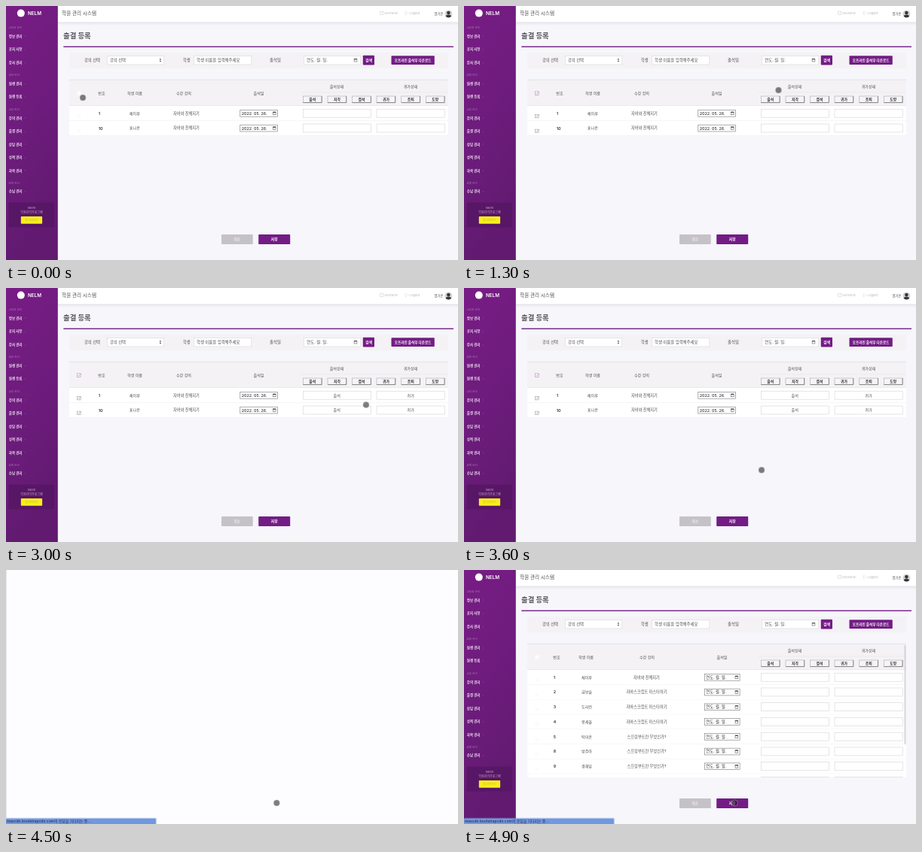
Recreate the animation shown at these times as an HTML page. Size 600 by 338 pixels, loop 5000 ms.

```html
<!DOCTYPE html>
<html lang="ko">
<head>
<meta charset="utf-8">
<title>출결 등록</title>
<style>
  html, body { margin: 0; width: 100%; height: 100%; overflow: hidden; background: #fdfcfe; }
  svg { display: block; width: 100vw; height: 100vh; }
  text { font-family: Inter, "Noto Sans CJK KR", "Noto Sans CJK", sans-serif; font-weight: 500; white-space: pre; }
</style>
</head>
<body>
<svg id="stage" viewBox="0 0 600 338" preserveAspectRatio="none"></svg>
<script>
const LOOP = 5000, STEP = 100;
const PURPLE = '#731c85', PRESSED = '#51155f', INK = '#504d52', PANEL = '#f4f2f4';

const rect = (x, y, w, h, fill, extra = '') =>
  `<rect x="${x}" y="${y}" width="${w}" height="${h}" fill="${fill}" ${extra}/>`;
const frame = (x, y, w, h, line, fill = '#fff', width = 0.6) =>
  rect(x, y, w, h, fill, `stroke="${line}" stroke-width="${width}"`);
// y is the vertical middle of the line of text
const text = (x, y, size, str, fill = INK, anchor = 'start', weight = 500) =>
  `<text x="${x}" y="${y + size * 0.36}" font-size="${size}" fill="${fill}" text-anchor="${anchor}" style="font-weight:${weight}">${str}</text>`;
const mid = (x, y, size, str, fill, weight) => text(x, y, size, str, fill, 'middle', weight);
const path = (d, stroke, width) =>
  `<path d="${d}" fill="none" stroke="${stroke}" stroke-width="${width}"/>`;
const group = (id, body) => `<g id="${id}">${body}</g>`;

const button = (x, y, w, h, fill, label, size, ink = '#fff') =>
  rect(x, y, w, h, fill, 'rx="0.8"') + mid(x + w / 2, y + h / 2, size, label, ink, 700);
const calendar = (x, y) =>
  frame(x - 1.9, y - 1.7, 3.8, 3.7, '#444', 'none', 0.5) + rect(x - 1.9, y - 2, 3.8, 1.2, '#444');

function sidebar() {
  const sections = [[28.5, '교육원 관리'], [92, '회원 관리'], [138, '교육 관리'], [236, '회계 관리']];
  const items = [
    [40, '정보 관리'], [57.7, '공지 사항'], [75.3, '강사 관리'], [103.2, '원생 관리'],
    [120.8, '원생 등록'], [149, '강의 관리'], [166.5, '출결 관리'], [184, '상담 관리'],
    [201.5, '성적 관리'], [219, '과목 관리'], [246.8, '수납 관리']
  ];
  return rect(0, 0, 68.8, 338, 'url(#side)') +
    '<circle cx="19.8" cy="9.6" r="5" fill="#fff"/>' +
    text(29, 9.8, 6.3, 'NELM', '#fff', 'start', 600) +
    sections.map(([y, s]) => text(3.5, y, 3.6, s, '#a673b2')).join('') +
    items.map(([y, s]) =>
      text(3.8, y, 4.5, s, '#eee0f1', 'start', 700) + text(24.4, y, 4, '›', '#9556a1')).join('') +
    rect(3.5, 261.5, 60.5, 33, '#581666', 'rx="1.5"') +
    mid(34, 268.8, 4, 'Nelm', '#b994c2') +
    mid(34, 274.2, 4, '학원관리프로그램', '#c9abd0') +
    button(19.8, 280, 28.3, 9.7, '#f6ee1c', '업그레이드', 3.8, '#dccd24');
}

function header() {
  return rect(68.8, 0, 531.2, 338, '#f6f6fb') +
    rect(68.8, 21, 531.2, 5, 'url(#shade)') + rect(68.8, 0, 531.2, 21.3, '#fff') +
    text(74, 9.6, 6.6, '학원 관리 시스템') +
    frame(496.8, 7.5, 4, 4.2, '#c9c6cc', 'none', 0.5) +
    text(502.3, 9.6, 3.7, 'username', '#c4c1c7') +
    path('M532 7.6h-1.8v4h1.8M532 9.6h2.8', '#d5d2d8', 0.5) +
    text(536, 9.6, 3.9, 'Logout', '#bcb9bf') +
    text(568.5, 10.2, 4.3, '염가온') +
    '<g clip-path="url(#face)">' + rect(582, 5, 11, 11, '#d8d5da') +
    '<circle cx="587.4" cy="9" r="2.3" fill="#39343a"/>' +
    '<ellipse cx="587.4" cy="15" rx="4" ry="3.6" fill="#39343a"/></g>' +
    text(76, 39.8, 9.4, '출결 등록', '#59565c', 'start', 700) +
    rect(76.3, 53.5, 517.7, 1.4, PURPLE);
}

function filters() {
  const line = '#d9d6db';
  return rect(84, 62, 503, 21, PANEL) +
    text(104, 72, 5.3, '강의 선택') + frame(134.3, 66.3, 75.5, 11.6, line) +
    text(138, 72, 5.3, '강의 선택') +
    '<path d="M203.6 71.5l1.3-2 1.3 2zM203.6 72.7l1.3 2 1.3-2z" fill="#555"/>' +
    text(235, 72, 5.3, '학생') + frame(249.3, 66.3, 76.5, 11.6, line) +
    text(253, 72, 5.4, '학생 이름을 입력해주세요') +
    text(350, 72, 5.4, '출석일') + frame(395.3, 66.3, 75.5, 11.6, line) +
    text(399.3, 72, 5.4, '연도. 월. 일.') + calendar(464, 72) +
    button(473.8, 65.8, 15.2, 12.6, PURPLE, '검색', 4.9) +
    button(511.5, 66.2, 57.3, 11.8, PURPLE, '오프라인 출석부 다운로드', 4.6);
}

function tableHead(columns) {
  const labels = ['번호', '학생 이름', '수강 강의', '출석일'];
  const keys = [[394.3, '출석'], [427, '지각'], [459.6, '결석'], [492, '귀가'], [524.8, '조퇴'], [557.3, '도망']];
  return rect(84, 98, 503, 35, PANEL) +
    rect(84, 97.8, 503, 0.7, '#dddadf') + rect(84, 132.6, 503, 0.7, '#dddadf') +
    rect(391, 114.7, 196, 0.5, '#e4e1e6') +
    rect(94.3, 113.5, 5.2, 5.2, '#fdfcfd') +
    columns.map((x, i) => mid(x, 116, 5.1, labels[i])).join('') +
    mid(439, 106.8, 5.1, '출석상태') + mid(537, 106.8, 5.1, '귀가상태') +
    keys.map(([x, s]) =>
      frame(x, 120, 24.8, 8.6, '#9c999f', '#f5f4f6', 0.5) +
      path(`M${x} 128.6h24.8v-8.6`, '#59565c', 0.6) +
      mid(x + 12.4, 124.3, 4.9, s, '#333', 700)).join('');
}

function row(y, [num, name, course], date, at) {
  return rect(84, y - 9.8, 503, 19.6, '#fff') + rect(84, y + 9.6, 503, 0.5, '#ececf0') +
    rect(94.5, y + 1.2, 4.6, 4.6, '#fbfafc') +
    text(at.num, y, 5.3, num, '#333', 'start', 600) +
    text(at.name, y, 5.1, name) +
    mid(at.course, y, 5.2, course) +
    frame(at.date, y - 4.4, at.dateW, 8.8, '#77747a', '#fff', 0.6) +
    text(at.date + 2, y, 5.3, date, '#333') +
    calendar(at.date + at.dateW - 4.2, y) +
    frame(394.3, y - 5.6, 90.2, 11, '#d5d2d8') + frame(492, y - 5.6, 90.2, 11, '#d5d2d8');
}

const tick = (x, y, color) =>
  frame(x - 2.3, y - 2.3, 4.6, 4.6, color, '#fff', 0.5) +
  path(`M${x - 1} ${y}l0.9 1 2.3-2.9`, color, 0.6);

const picked = [['1', '채이루', '자바와 친해지기'], ['10', '표나온', '자바와 친해지기']];
const all = [
  picked[0],
  ['2', '금보슬', '자바스크립트 마스터하기'], ['3', '도라언', '자바스크립트 마스터하기'],
  ['4', '봉세율', '자바스크립트 마스터하기'], ['5', '탁미온', '스프링부트란 무엇인가?'],
  ['8', '방주아', '스프링부트란 무엇인가?'], ['9', '경해담', '스프링부트란 무엇인가?'],
  picked[1]
];
const rowY = [142.8, 162.6];
const pickedAt = { num: 122.8, name: 163.8, course: 239.5, date: 310.8, dateW: 49.6 };
const allAt = { num: 118.8, name: 156, course: 242.5, date: 319.3, dateW: 46.8 };

const stage = document.getElementById('stage');
stage.innerHTML =
  `<defs>
    <linearGradient id="side" x1="0" y1="0" x2="0.3" y2="1">
      <stop offset="0" stop-color="#781c85"/><stop offset="0.5" stop-color="#6e1c7d"/><stop offset="1" stop-color="#611a70"/>
    </linearGradient>
    <linearGradient id="shade" x1="0" y1="0" x2="0" y2="1">
      <stop offset="0" stop-color="#e3e2ea"/><stop offset="1" stop-color="#f6f6fb"/>
    </linearGradient>
    <clipPath id="face"><circle cx="587.4" cy="10.4" r="5"/></clipPath>
    <clipPath id="list"><rect x="84" y="133" width="503" height="143"/></clipPath>
  </defs>` +
  group('page',
    header() + sidebar() + filters() +
    group('before',
      tableHead([127, 171, 236, 335.5]) +
      picked.map((r, i) => row(rowY[i], r, '2022. 05. 26.', pickedAt)).join('') +
      group('checks', tick(96.8, 116.2, '#a268ad') + rowY.map(y => tick(96.8, y + 3.8, '#8f8a92')).join('')) +
      group('present', rowY.map(y => mid(439.3, y, 5.1, '출석')).join('')) +
      group('left', rowY.map(y => mid(537, y, 5.1, '귀가')).join(''))) +
    group('after',
      tableHead([123, 162, 243, 342.5]) +
      '<g clip-path="url(#list)">' +
      all.map((r, i) => row(142.8 + i * 19.75, r, '연도. 월. 일.', allAt)).join('') + '</g>' +
      rect(584.6, 100, 1.8, 132, '#d3d0d6', 'rx="0.9"')) +
    button(286, 304, 41.7, 13, '#c5c2c7', '취소', 4.8, '#eceaed') +
    button(335.2, 304, 42, 13, PURPLE, '저장', 4.8) +
    group('pressed', button(335.2, 304, 42, 13, PRESSED, '저장', 4.8))) +
  group('blank', rect(0, 0, 600, 338, '#fdfcfe') + rect(0, 0, 0.8, 338, '#e2e0e5')) +
  group('status',
    rect(0, 329.8, 200, 9, '#8aa0cc', 'rx="1.5" opacity="0.45"') + rect(0, 330.8, 198.8, 8, '#7098e2', 'rx="1"') +
    text(1, 334.6, 4.9, 'maxcdn.bootstrapcdn.com의 응답을 기다리는 중...', '#24324f')) +
  '<circle id="cursor" r="4" fill="#000" fill-opacity="0.5" stroke="#b5b5b5" stroke-opacity="0.75" stroke-width="0.7"/>';

// [id, from, to] in ms
const shown = [
  ['page', 0, 4500], ['page', 4700, LOOP], ['blank', 4500, 4700],
  ['before', 0, 4500], ['after', 4700, LOOP],
  ['checks', 400, 4500], ['present', 1700, 4500], ['left', 2300, 4500],
  ['pressed', 4200, 4500], ['status', 4300, LOOP]
];
// [time, x, y]
const moves = [
  [0, 102, 122], [200, 98, 117], [700, 98, 117], [1300, 417.5, 112], [1500, 407, 124],
  [1800, 407, 124], [2200, 507, 125], [2700, 507, 125], [3600, 395, 242.3],
  [4100, 359.3, 310], [LOOP, 359.3, 310]
];

const ids = [...new Set(shown.map(s => s[0]))];
const el = id => document.getElementById(id);
const ease = u => u * u * (3 - 2 * u);

function place(t) {
  const i = moves.findIndex((m, k) => k > 0 && t < m[0]);
  const [t0, x0, y0] = moves[i - 1], [t1, x1, y1] = moves[i];
  const u = ease((t - t0) / (t1 - t0));
  return [x0 + (x1 - x0) * u, y0 + (y1 - y0) * u];
}

function draw(t) {
  for (const id of ids) {
    const on = shown.some(([name, a, b]) => name === id && t >= a && t < b);
    el(id).style.display = on ? '' : 'none';
  }
  const [x, y] = place(t);
  el('cursor').setAttribute('transform', `translate(${x} ${y})`);
}

const start = performance.now();
function play(now) {
  const t = Math.max(0, now - start) % LOOP;
  draw(Math.floor(t / STEP) * STEP);
  requestAnimationFrame(play);
}
draw(0);
requestAnimationFrame(play);
</script>
</body>
</html>
```
